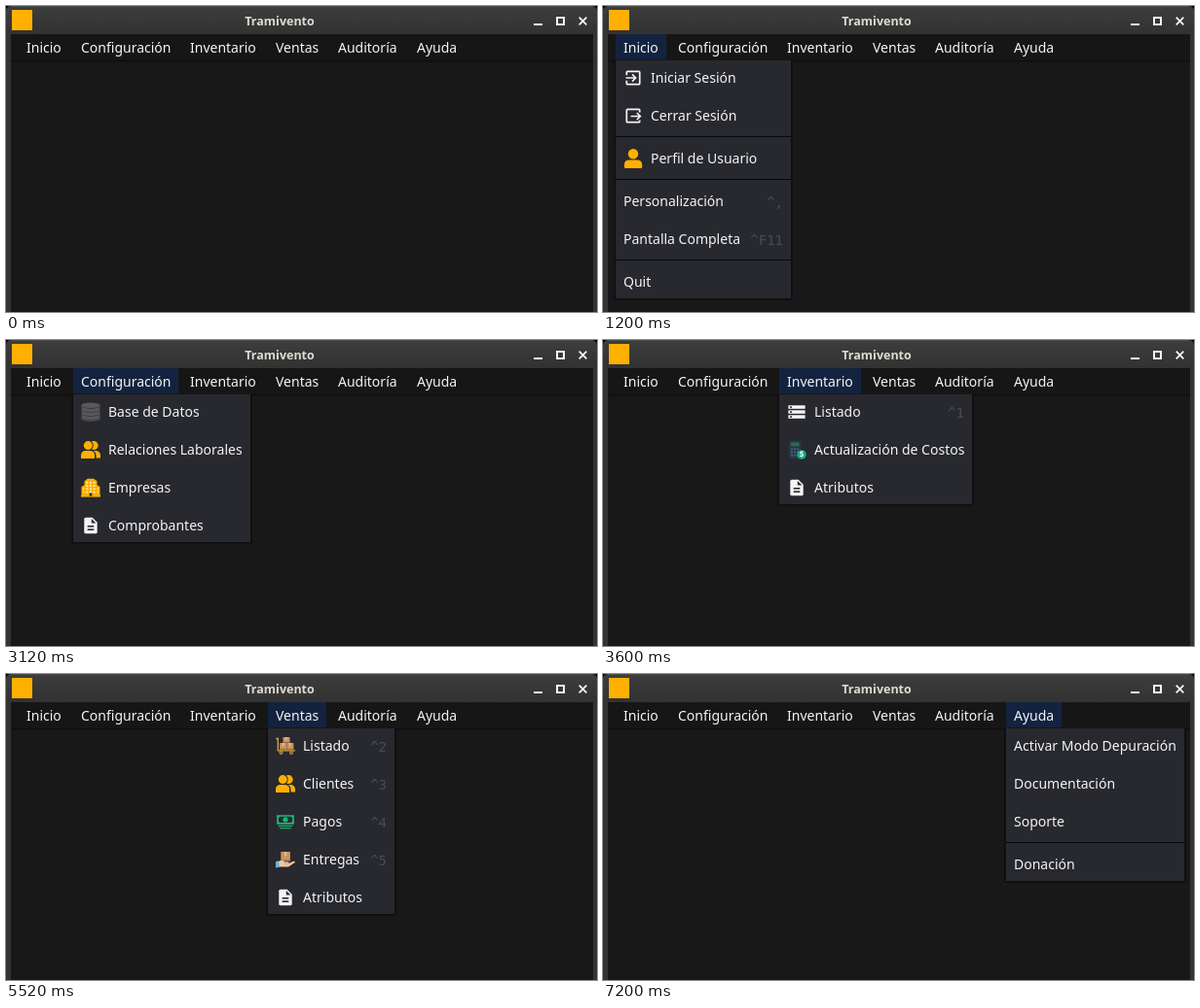
An HTML page with a canvas for the animation above (8400 ms loop, 607 by 315 pixels).

```html
<!DOCTYPE html>
<html lang="es">
<head>
<meta charset="utf-8">
<title>Tramivento</title>
<style>
html, body { margin: 0; width: 100%; height: 100%; overflow: hidden; background: #181818; }
canvas { display: block; }
</style>
</head>
<body>
<canvas id="stage" width="607" height="315"></canvas>
<script>
const ctx = document.getElementById('stage').getContext('2d');
const AMBER = '#ffb000', WHITE = '#f4f4f4', PANEL = '#28292e';
const SANS = '14px "Noto Sans", sans-serif';
const MONO = '14px "DejaVu Sans Mono", monospace';
const STEP = 1200;

// Row: [label, icon, shortcut]; null is a separator.
const menus = [
  { name: 'Inicio', x: 13, w: 52, panel: 180, rows: [
    ['Iniciar Sesión', 'login'], ['Cerrar Sesión', 'logout'], null,
    ['Perfil de Usuario', 'person'], null,
    ['Personalización', '', '^,'], ['Pantalla Completa', '', '^F11'], null, ['Quit']] },
  { name: 'Configuración', x: 69, w: 108, panel: 182, rows: [
    ['Base de Datos', 'database'], ['Relaciones Laborales', 'people'],
    ['Empresas', 'building'], ['Comprobantes', 'page']] },
  { name: 'Inventario', x: 181, w: 84, panel: 198, rows: [
    ['Listado', 'list', '^1'], ['Actualización de Costos', 'calculator'], ['Atributos', 'page']] },
  { name: 'Ventas', x: 269, w: 60, panel: 130, rows: [
    ['Listado', 'trolley', '^2'], ['Clientes', 'people', '^3'], ['Pagos', 'cash', '^4'],
    ['Entregas', 'hand', '^5'], ['Atributos', 'page']] },
  { name: 'Auditoría', x: 333, w: 77, panel: 91, rows: [['Revisar', 'inspector']] },
  { name: 'Ayuda', x: 414, w: 57, panel: 183, rows: [
    ['Activar Modo Depuración'], ['Documentación'], ['Soporte'], null, ['Donación']] }
];

function rect(color, x, y, w, h, r = 0) {
  ctx.fillStyle = color;
  ctx.beginPath();
  ctx.roundRect(x, y, w, h, r);
  ctx.fill();
}
function disc(color, x, y, rx, ry = rx) {
  ctx.fillStyle = color;
  ctx.beginPath();
  ctx.ellipse(x, y, rx, ry, 0, 0, Math.PI * 2);
  ctx.fill();
}
function fill(color, d) {
  ctx.fillStyle = color;
  ctx.fill(new Path2D(d));
}
function stroke(color, width, d) {
  ctx.strokeStyle = color;
  ctx.lineWidth = width;
  ctx.stroke(new Path2D(d));
}
function text(str, x, y, color = WHITE, font = SANS, align = 'left') {
  ctx.font = font;
  ctx.fillStyle = color;
  ctx.textAlign = align;
  ctx.fillText(str, x, y);
}
function crate(x, y, w, h) {
  rect('#c99562', x, y, w, h, 0.5);
  rect('#e3bd8c', x + w * 0.38, y, w * 0.24, h * 0.45);
  rect('#9b6a42', x, y + h - 1, w, 1);
}

// Every icon fills a 20 by 20 box.
const icons = {
  login() {
    stroke(WHITE, 1.7, 'M3.3 7.3V4.3Q3.3 3.3 4.3 3.3H15.7Q16.7 3.3 16.7 4.3V15.7Q16.7 16.7 15.7 16.7H4.3Q3.3 16.7 3.3 15.7V12.7M2.5 10H12.5M9 6.4L12.6 10L9 13.6');
  },
  logout() {
    stroke(WHITE, 1.7, 'M16.7 6.6V4.3Q16.7 3.3 15.7 3.3H4.3Q3.3 3.3 3.3 4.3V15.7Q3.3 16.7 4.3 16.7H15.7Q16.7 16.7 16.7 15.7V14.4M7.5 10.5H17M13.8 7L17.3 10.5L13.8 14');
  },
  person() {
    disc(AMBER, 10, 5.2, 5.2);
    fill(AMBER, 'M0.8 18.5V17Q0.8 11.6 6.2 11.6H13.8Q19.2 11.6 19.2 17V18.5Q19.2 20 17.7 20H2.3Q0.8 20 0.8 18.5Z');
  },
  database() {
    const gray = '#59595b';
    for (const y of [15.2, 11.2, 7.2, 3.2]) {
      rect(gray, 0.3, y, 19.4, 1.6);
      disc(gray, 10, y + 1.5, 9.7, 3);
      stroke(PANEL, 0.9, `M0 ${y}Q2 ${y + 3} 10 ${y + 3}T20 ${y}`);
      disc(gray, 10, y, 9.7, 2.8);
    }
  },
  people() {
    disc(AMBER, 13.2, 5.6, 4.5);
    fill(AMBER, 'M12 11H14.5Q20 11 20 16V18.5H14Z');
    disc(PANEL, 7.3, 5.6, 5.4);
    disc(AMBER, 7.3, 5.6, 4.5);
    stroke(PANEL, 1.5, 'M9.5 11Q14.8 11.5 14.8 16V19');
    fill(AMBER, 'M0 18.5V16Q0 11 5.2 11H9Q14 11 14 16V18.5Q14 19 13.3 19H0.7Q0 19 0 18.5Z');
  },
  building() {
    fill(AMBER, 'M0.5 18V9L3.5 7.2V3.2L7 0.8H13L16.5 3.2V7.2L19.5 9V18Z');
    rect(AMBER, 0, 17.6, 20, 2);
    for (let row = 0; row < 4; row++) {
      for (let col = 0; col < 3; col++) rect('#fff0c4', 5.4 + col * 3.6, 4 + row * 3.2, 1.9, 1.8);
    }
    for (const y of [10.5, 13.7]) {
      rect('#fff0c4', 2, y, 1.2, 1.6);
      rect('#fff0c4', 16.8, y, 1.2, 1.6);
    }
    rect(PANEL, 8.7, 15.6, 2.6, 3);
  },
  page() {
    fill(WHITE, 'M5 1.7H11.7L16.7 6.7V16.7Q16.7 18.3 15 18.3H5Q3.3 18.3 3.3 16.7V3.3Q3.3 1.7 5 1.7Z');
    fill(PANEL, 'M10.8 2.9V7.5H15.4Z');
    rect(PANEL, 6.7, 10, 6.6, 1.6);
    rect(PANEL, 6.7, 13.4, 6.6, 1.6);
  },
  list() {
    for (const y of [3.3, 8.3, 13.3]) {
      rect(WHITE, 1.4, y, 17.2, 3.5);
      rect(PANEL, 3.2, y + 0.9, 1.7, 1.7);
    }
  },
  calculator() {
    rect('#24384a', 2, 0.5, 12.5, 18.5, 1.5);
    rect('#2f6b4f', 4, 2.5, 8.5, 3.8);
    for (let i = 0; i < 9; i++) {
      rect('#47617a', 4 + i % 3 * 3.1, 8.4 + Math.floor(i / 3) * 3.2, 2, 1.8);
    }
    disc('#12a884', 15, 15, 4.8);
    text('$', 15, 17.9, '#e8fff6', 'bold 8px "Noto Sans", sans-serif', 'center');
  },
  trolley() {
    crate(7.5, 1, 7, 6);
    crate(4.2, 7, 7, 7);
    crate(11.4, 7, 7, 7);
    stroke('#e0a643', 1.3, 'M0.3 2.5H2.3V14.8H20');
    disc('#b98a52', 5.5, 17, 2);
    disc('#b98a52', 16, 17, 2);
    disc('#4b4038', 5.5, 17, 0.8);
    disc('#4b4038', 16, 17, 0.8);
  },
  cash() {
    const green = '#1fb477';
    stroke(green, 1.7, 'M2 4H18V11.8H2Z');
    disc(green, 10, 7.9, 2.6);
    fill(green, 'M2 4H5L2 7ZM18 4V7L15 4ZM2 11.8V8.8L5 11.8ZM18 11.8H15L18 8.8Z');
    rect(green, 2.8, 13.8, 14.4, 1.2);
    rect(green, 4.3, 16.1, 11.4, 1.2);
  },
  hand() {
    crate(5.3, 2, 9.6, 9.5);
    fill('#f2c7a0', 'M2.5 12L6 10.8Q8 10.8 9.5 12.4H13Q14.5 13.2 13 14.2L18 11.8Q20 11.3 19.8 13L13 17.6H3Z');
    stroke('#ce9a74', 0.6, 'M8 14.4H13');
    fill('#6db3e2', 'M0 12L3 11.4L4 17.7L0 18.5Z');
  },
  inspector() {
    const line = '#fff1c8';
    rect(AMBER, 0, 0, 20, 20);
    stroke(line, 1, 'M5 6Q10 8 15 6M7 6L8 2.6Q10 3.6 12 2.6L13 6M7.2 7.4Q7.2 11.3 10 11.3T12.8 7.4M7 11L2.8 14V18H7M13 11L17.2 14V18H10.5M8 11.5L10 14.5L12 11.5M10 14.5V18');
    ctx.beginPath();
    ctx.arc(6.2, 14.2, 2.4, 0, Math.PI * 2);
    ctx.stroke();
    stroke(line, 1, 'M8 16L10 18');
  }
};

function drawWindow() {
  rect('#000', 0, 0, 607, 315);
  const bar = ctx.createLinearGradient(0, 0, 0, 29);
  bar.addColorStop(0, '#3d3d3d');
  bar.addColorStop(1, '#323232');
  rect('#333333', 0, 20, 607, 295);
  rect(bar, 0, 0, 607, 29, [5, 5, 0, 0]);
  rect('#4a4a4a', 5, 0, 597, 1);
  rect('#181818', 5, 29, 598, 286);
  rect('#161616', 5, 29, 598, 27);
  rect('#0e0e0e', 5, 56, 598, 1);
  rect('#141414', 5, 57, 598, 1);

  rect(AMBER, 6, 4, 21, 21);
  text('Tramivento', 281, 20, '#dfdbd2', 'bold 12.5px "Open Sans", sans-serif', 'center');
  rect('#f2f2f2', 542, 18, 9, 2);
  stroke('#f2f2f2', 2, 'M566 12H573V19H566Z');
  stroke('#f2f2f2', 1.8, 'M588.7 11.7L596.3 19.3M596.3 11.7L588.7 19.3');
}

function drawPanel({ x, panel, rows }) {
  let y = 35;
  const centers = rows.map(row => y += row ? 39 : 5);
  const height = y + 17 - 56;
  rect('rgba(0,0,0,.3)', x - 2, 56, panel + 4, height + 2, 2);
  rect('#0f0f11', x - 1, 56, panel + 2, height + 1, 1);
  rect(PANEL, x, 56, panel, height);

  rows.forEach((row, i) => {
    const cy = centers[i];
    if (!row) return rect('#09090a', x, cy + 16, panel, 1);
    const [label, icon, keys] = row;
    if (icon) {
      ctx.save();
      ctx.translate(x + 8, cy - 10);
      icons[icon]();
      ctx.restore();
    }
    text(label, x + (icon ? 36 : 8), cy + 5);
    if (keys) text(keys, x + panel - 8, cy + 6, '#4b4c50', MONO, 'right');
  });
}

function draw(now) {
  const open = menus[Math.floor(now % (STEP * 7) / STEP) - 1];
  drawWindow();
  if (open) rect('#13233f', open.x, 29, open.w, 26);
  for (const menu of menus) text(menu.name, menu.x + 8, 48);
  if (open) drawPanel(open);
}

const start = performance.now();
function tick() {
  draw(performance.now() - start);
  requestAnimationFrame(tick);
}
tick();
</script>
</body>
</html>
```
